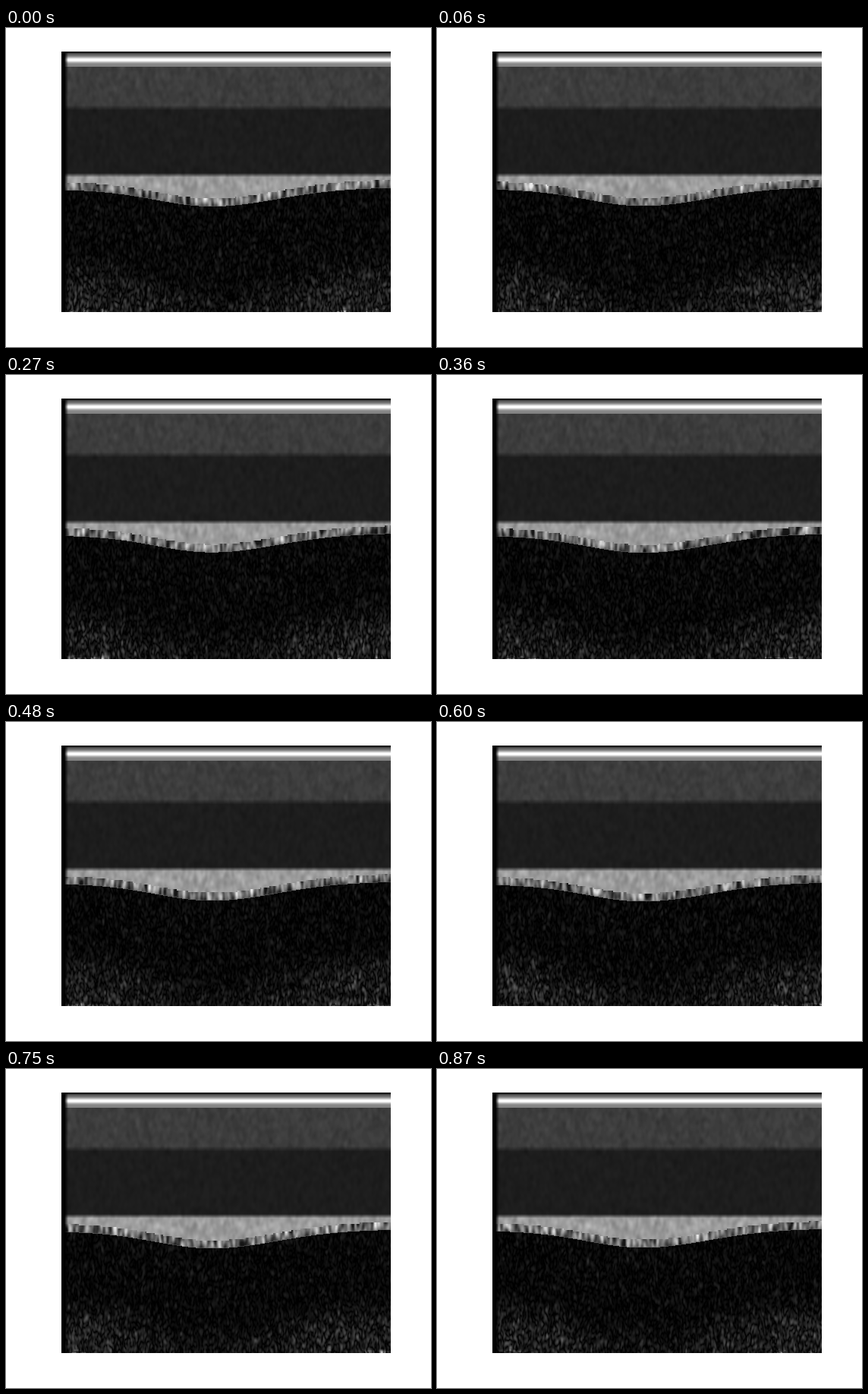
Animation of 560 by 420 pixels, one loop 0.9 s. Source, as a matplotlib script:

```python
import numpy as np
import matplotlib.pyplot as plt
from matplotlib.animation import FuncAnimation

W, H, DPI = 560, 420, 100
FRAMES, STEP = 30, 30
LEFT, RIGHT, TOP, BOTTOM = 73, 507, 31, 374

x = np.arange(LEFT, RIGHT, dtype=float)
y = np.arange(TOP, BOTTOM, dtype=float)[:, None]
shape = (len(y), len(x))
fx = np.fft.fftfreq(shape[1])
fy = np.fft.fftfreq(shape[0])[:, None]


def smooth_noise(rng, sx, sy):
    """Complex Gaussian noise, blurred and scaled to unit variance per part."""
    n = rng.normal(size=shape) + 1j * rng.normal(size=shape)
    blur = np.exp(-2 * np.pi**2 * ((sx * fx)**2 + (sy * fy)**2))
    n = np.fft.ifft2(np.fft.fft2(n) * blur)
    return n / n.real.std()


def ramp(v, start, end):
    return np.clip((v - start) / (end - start), 0, 1)


def bell(v, centre, width):
    return np.exp(-((v - centre) / width)**2 / 2)


# Still layers: bright probe echo, two grey bands, light gel
echo = 60 + 70 * ramp(y, 31, 38) + 135 * bell(y, 41.5, 2.3)
echo *= ramp(y, 30, 34)
bands = 61 - 32 * ramp(y, 101, 108)
gel = ramp(y, 190.5, 196)
layers = np.where(y < 51, echo, bands) + (156 - 29) * gel
grain = np.where(y < 51, 0, 0.055 * layers)
still = smooth_noise(np.random.default_rng(4), 1.9, 3).real

dip = bell(x, 272, np.where(x < 272, 76, 85))
surface = 212 - 2.5 * ramp(x, 80, 507) + 23.5 * dip
deep_edge = 308 + 42 * dip
side_fade = ramp(x, 76.5, 81.5)


def sway(i):
    """Vertical drift of the tissue surface in pixels."""
    return 0.2 - 1.5 * np.sin(2 * np.pi * i / FRAMES)


def tissue(rng):
    """Dark tissue with a brighter speckle far down."""
    speckle = np.abs(smooth_noise(rng, 1.2, 2.5))
    deep = ramp(y, deep_edge - 15, deep_edge + 30)
    img = np.maximum(speckle * (10 + 16 * deep * (1 - 0.5 * dip)) - 4, 0)
    glints = smooth_noise(rng, 6, 1).real > 0.4
    return img + 28 * speckle * glints * ramp(y, 368, 373) * (dip < 0.2)


def scan(i):
    rng = np.random.default_rng(100 + i)
    low = surface + sway(i)
    flicker = smooth_noise(rng, 1.6, 2.8).real
    img = layers + grain * (0.85 * still + 0.4 * flicker)
    img = np.where(y >= low, tissue(rng), img)

    # Striped skin line with a stepped upper edge and a thin rim
    skin_top = 2 * np.round(low / 2) - 10
    stripes = 112 + 42 * smooth_noise(rng, 1.5, 5).real
    stripes = np.clip(stripes, 22, 235) * (1 - 0.15 * ramp(y, low - 6, low))
    img = np.where((y >= skin_top) & (y < low), stripes, img)
    img = np.where((y >= low - 1) & (y < low), 0.5 * img + 45, img)

    frame = np.full((H, W), 255.0)
    frame[TOP:BOTTOM, LEFT:RIGHT] = np.clip(img * side_fade, 0, 255)
    return frame


fig = plt.figure(figsize=(W / DPI, H / DPI), dpi=DPI)
ax = fig.add_axes([0, 0, 1, 1])
ax.axis("off")
picture = ax.imshow(scan(0), cmap="gray", vmin=0, vmax=255,
                    interpolation="nearest", aspect="auto")


def update(i):
    picture.set_data(scan(i))
    return [picture]


anim = FuncAnimation(fig, update, frames=FRAMES, interval=STEP,
                     repeat=True, repeat_delay=0)
plt.show()
```
